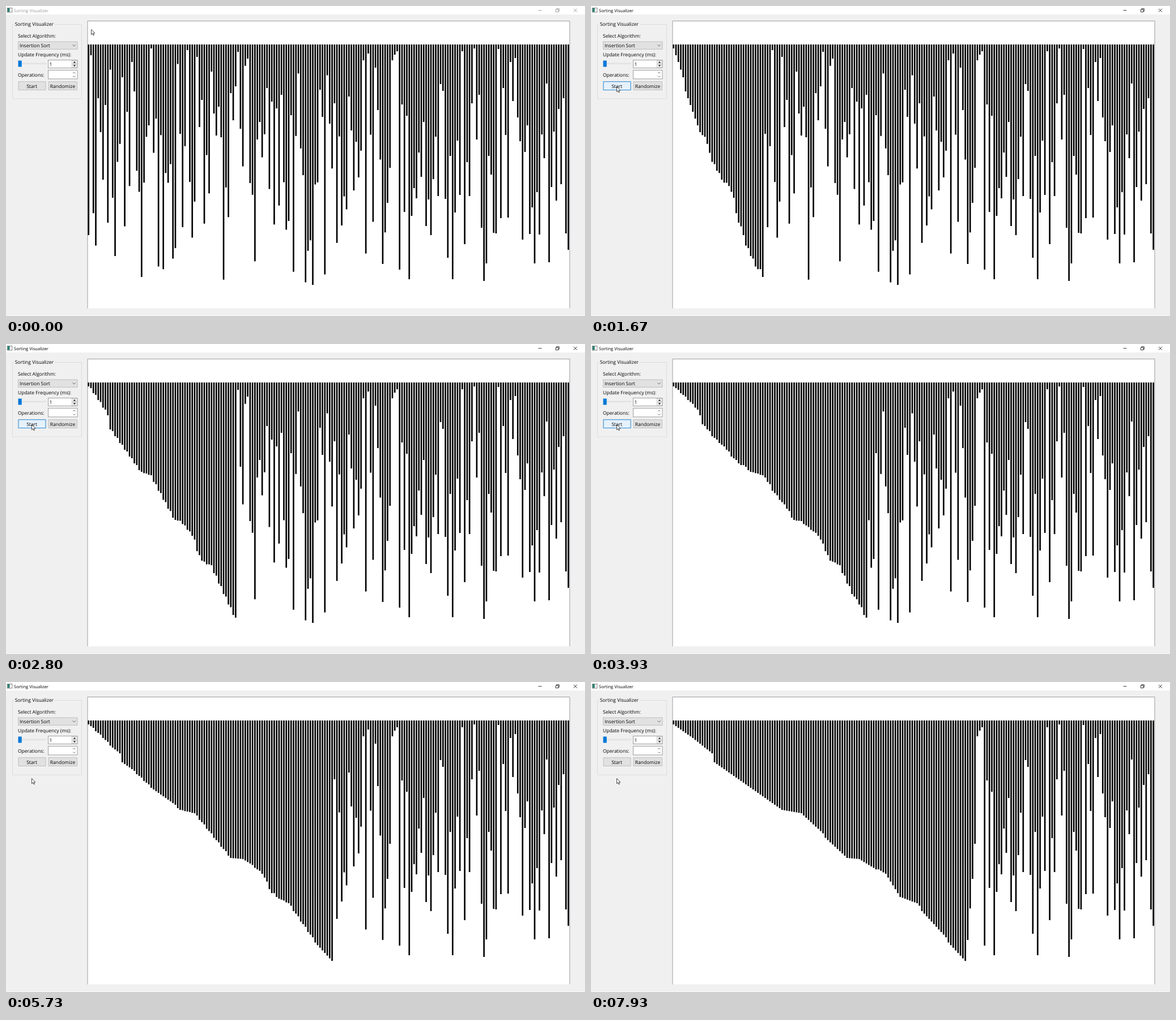
Animation, 1022 px wide and 548 px high, one loop 8000 ms. Source, as an HTML page:

```html
<!DOCTYPE html>
<html lang="en">
<head>
<meta charset="utf-8">
<title>Sorting Visualizer</title>
<style>
html, body { margin: 0; width: 100%; height: 100%; overflow: hidden; background: #f0f0f0; }
svg { display: block; width: 1022px; height: 548px; }
text { font: 8.5px "Open Sans", "Noto Sans", sans-serif; text-rendering: geometricPrecision; fill: #000; }
.box { fill: #fff; stroke: #7a7a7a; stroke-width: .7; }
.btn { fill: #e1e1e1; stroke: #adadad; stroke-width: .7; }
.mark { fill: none; stroke: #444; stroke-width: .8; }
.mid { text-anchor: middle; }
</style>
</head>
<body>
<svg viewBox="0 0 1022 548">
  <rect width="1022" height="548" fill="#f0f0f0"/>
  <rect width="1022" height="15" fill="#fff"/>
  <rect y="547" width="1022" height="1" fill="#fafafa"/>

  <rect x="2.2" y="3.5" width="8.6" height="7.5" fill="#fff" stroke="#666" stroke-width=".8"/>
  <rect x="2.6" y="4" width="4" height="6.6" fill="#2f8073"/>
  <text id="title" x="14" y="10.6" style="font-size:7.6px">Sorting Visualizer</text>
  <g id="controls" fill="none" stroke-width=".8">
    <path d="M939.5 7.7h6"/>
    <path d="M970.5 6.2h4.4v4.4h-4.4zM971.8 6v-1.3h4.5v4.5h-1.3"/>
    <path d="M1002 4.7l6 6m0-6l-6 6"/>
  </g>

  <rect x="11.5" y="32.5" width="122" height="131.5" fill="none" stroke="#dcdcdc"/>
  <rect x="14" y="28" width="72" height="9" fill="#f0f0f0"/>
  <text x="15.7" y="35">Sorting Visualizer</text>
  <text x="21" y="56.3">Select Algorithm:</text>
  <rect class="btn" x="21.5" y="63" width="104.5" height="13.3"/>
  <text x="24" y="72.9">Insertion Sort</text>
  <path class="mark" d="M117.5 68.4l2.6 2.6 2.6-2.6"/>

  <text x="21" y="89.4">Update Frequency (ms):</text>
  <rect x="22" y="101" width="49" height="1.6" fill="#e7eaea" stroke="#d6d6d6" stroke-width=".5"/>
  <rect x="21.5" y="96.5" width="6.2" height="11" fill="#0078d7"/>
  <rect class="box" x="74.5" y="95.7" width="51.5" height="13.6"/>
  <text x="76.5" y="105.8">1</text>
  <path d="M116.3 96.4h9.2v5.8h-9.2zM116.3 103h9.2v5.8h-9.2z" fill="#f0f0f0" stroke="#adadad" stroke-width=".6"/>
  <path d="M118.7 100.6l2.2-2.5 2.2 2.5zM118.7 104.6l2.2 2.5 2.2-2.5z"/>

  <text x="21" y="124.9">Operations:</text>
  <rect class="box" x="74.5" y="113.7" width="51.5" height="15.2"/>
  <path class="mark" d="M118.3 119l2-2 2 2M118.3 123.6l2 2 2-2"/>

  <rect class="btn" x="22" y="133.8" width="48" height="14.6"/>
  <rect id="hover" x="22" y="133.8" width="48" height="14.6" fill="#e5f1fb" stroke="#0078d7" stroke-width=".8"/>
  <rect id="press" x="22" y="133.8" width="48" height="14.6" fill="#cce4f7" stroke="#005499" stroke-width=".8"/>
  <text class="mid" x="45.6" y="144.6">Start</text>
  <rect class="btn" x="75" y="133.8" width="50.5" height="14.6"/>
  <text class="mid" x="100" y="144.6">Randomize</text>

  <rect x="144" y="26.5" width="851" height="508" fill="#fff"/>
  <path d="M144 534.5V26.5H995V534.5" fill="none" stroke="#828790" stroke-width=".8"/>
  <path id="bars"/>
  <path id="cursor" d="M0 0V9.2L2.1 7.2 3.5 10.4 4.9 9.8 3.5 6.7H6.4Z" fill="#fff" stroke="#000" stroke-width=".7"/>
</svg>
<script>
const $ = id => document.getElementById(id);
const LOOP = 8000, STEPS = 120, STEP = LOOP / STEPS;
const TOP = 68, LEFT = 144.4, PITCH = 4.256, WIDTH = 2.66;

const ramp = (t, from, to) => Math.min(1, Math.max(0, (t - from) / (to - from)));
const ease = u => u * u * (3 - 2 * u);

// Piecewise linear lookup in rows of [position, value].
function lerpAt(rows, x) {
  const k = rows.findIndex(row => x < row[0]);
  if (k < 0) return rows[rows.length - 1][1];
  if (k === 0) return rows[0][1];
  const [x0, y0] = rows[k - 1], [x1, y1] = rows[k];
  return y0 + (y1 - y0) * (x - x0) / (x1 - x0);
}

// Left part: four seeded shuffles, each spread evenly over the sorted profile.
const BLOCKS = 4, BLOCK = 31;
const profile = [[0, 75], [8, 99], [16, 126], [17, 142], [45, 226], [53, 232],
  [73, 311], [78, 313], [88, 339], [94, 380], [101, 391], [123, 493]];
const noise = i => { const v = Math.sin((i + 1) * 12.9898) * 43758.5453; return v - Math.floor(v); };
const data = [];
for (let b = 0; b < BLOCKS; b++) {
  const key = r => noise(b * BLOCK + r);
  Array.from({ length: BLOCK }, (_, r) => r)
    .sort((p, q) => key(p) - key(q))
    .forEach(r => data.push(lerpAt(profile, r * BLOCKS + b)));
}
// Right part: never reached by the sort.
data.push(
  348, 286, 96, 86, 80, 466, 174, 364, 194, 483, 371, 322, 340, 259, 302, 205, 389, 342, 405,
  306, 231, 336, 138, 150, 341, 445, 265, 483, 365, 238, 334, 80, 421, 276, 336, 172, 75, 236,
  157, 392, 486, 455, 265, 298, 401, 402, 76, 375, 145, 228, 374, 99, 168, 92, 197, 239, 413,
  258, 211, 403, 356, 455, 329, 404, 227, 269, 137, 453, 320, 222, 344, 182, 315, 163, 402, 431);

// Operations spent before each key is picked up: its shifts plus one.
const spent = [0];
data.forEach((key, i) => spent.push(spent[i] + 1 + data.slice(0, i).filter(v => v > key).length));

// Time against the key being inserted; the fraction is how far it has travelled.
const pace = [[1190, 0], [1670, 37.1], [2800, 61.2], [3930, 82.2], [4800, 94.3], [6600, 110.3], [7930, 123.3]]
  .map(([t, key]) => {
    const i = Math.floor(key);
    return [t, spent[i] + (key - i) * (spent[i + 1] - spent[i])];
  });

function barsAt(t) {
  const ops = Math.floor(lerpAt(pace, t));
  let i = 0;
  while (spent[i + 1] <= ops) i++;
  const shifts = ops - spent[i];
  const done = data.slice(0, i).sort((a, b) => a - b);
  const out = [...done, ...data.slice(i)];
  for (let j = i; j > i - shifts; j--) out[j] = done[j - 1];
  return out;
}

function draw(t) {
  const active = t >= 1130;
  const x = 150.5 - 105 * ease(ramp(t, 30, 480));
  const y = 41.5 + 105 * ease(ramp(t, 30, 500)) - 4 * ramp(t, 510, 600) + 28 * ease(ramp(t, 4400, 4670));
  $("title").style.fill = active ? "#000" : "#999";
  $("controls").setAttribute("stroke", active ? "#000" : "#888");
  $("hover").setAttribute("opacity", ramp(t, 400, 600) - ramp(t, 4460, 4700));
  $("press").setAttribute("opacity", active ? 1 - ramp(t, 1200, 1400) : 0);
  $("cursor").setAttribute("transform", `translate(${x} ${y})`);
  $("bars").setAttribute("d", barsAt(t)
    .map((end, i) => `M${(LEFT + i * PITCH).toFixed(2)} ${TOP}h${WIDTH}V${end.toFixed(1)}h-${WIDTH}z`).join(""));
}

const start = performance.now();
let shown = -1;
function tick() {
  const t = (performance.now() - start) % LOOP;
  const step = Math.floor((t + 2) / STEP) % STEPS;
  if (step !== shown) draw((shown = step) * STEP + 2);
  requestAnimationFrame(tick);
}
tick();
</script>
</body>
</html>
```
